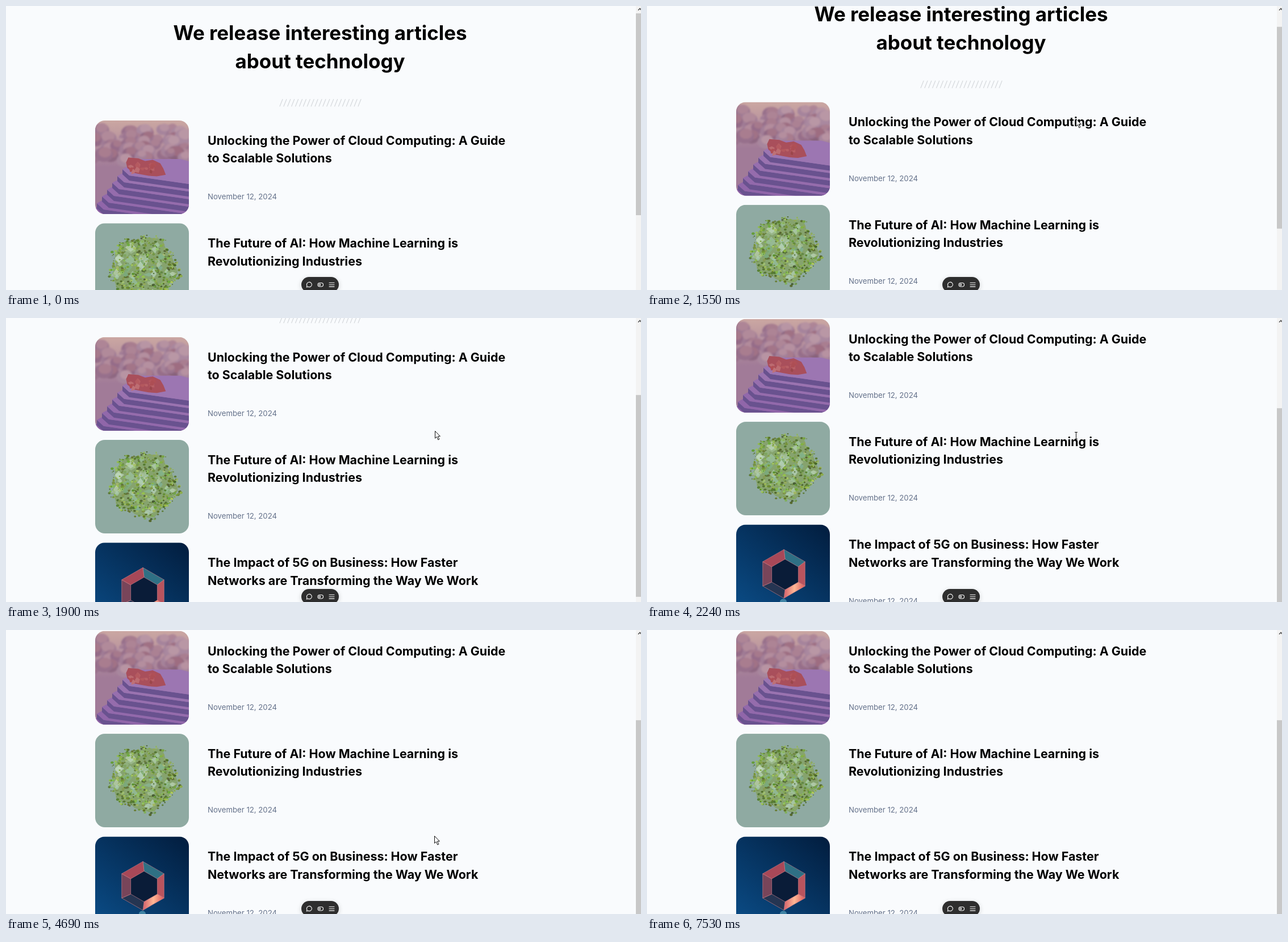
These frames come from a looping animation (1118 px wide and 501 px high, 8130 ms). An HTML page:

```html
<!DOCTYPE html>
<html lang="en">
<head>
<meta charset="utf-8">
<title>Articles about technology</title>
<style>
  html, body { margin: 0; width: 100%; height: 100%; overflow: hidden; background: #f9fbfd; }
  svg { display: block; width: 100%; height: 100%; }
  text { font-family: Inter, "Open Sans", sans-serif; font-weight: 700; }
  .heading { font-size: 34.9px; text-anchor: middle; }
  .title { font-size: 21.4px; }
  .date { font-size: 13.2px; font-weight: 400; fill: #64718a; }
  .line { fill: none; stroke-linecap: round; stroke-linejoin: round; }
</style>
</head>
<body>
<svg viewBox="0 0 1118 501">
  <defs>
    <clipPath id="card"><rect width="165" height="165" rx="17"/></clipPath>
    <filter id="soft"><feGaussianBlur stdDeviation="1.6"/></filter>
    <filter id="shadow" x="-50%" y="-80%" width="200%" height="260%"><feGaussianBlur stdDeviation="5"/></filter>
    <linearGradient id="dusk" x2="0" y2="1">
      <stop stop-color="#cba7a2"/><stop offset=".5" stop-color="#a17b98"/>
    </linearGradient>
    <linearGradient id="night" x1="1" x2=".2" y2="1">
      <stop stop-color="#021d3e"/><stop offset="1" stop-color="#0a4a83"/>
    </linearGradient>
    <linearGradient id="glow">
      <stop stop-color="#d5606a"/><stop offset=".5" stop-color="#ffb795"/><stop offset="1" stop-color="#d9565a"/>
    </linearGradient>
  </defs>

  <g id="page">
    <text class="heading" x="553" y="60">We release interesting articles</text>
    <text class="heading" x="553" y="109.5">about technology</text>
    <path id="slashes" class="line" stroke="#d3d6da" stroke-width="1.1"/>
    <g id="cards"></g>
  </g>

  <rect x="1109" width="9" height="501" fill="#f3f3f3"/>
  <rect id="thumb" x="1109" y="13" width="9" height="356" fill="#c8c8c8"/>
  <path d="M1113 7.5l3-3 3 3" fill="none" stroke="#555" stroke-width="1.6"/>

  <rect x="520" y="480" width="66" height="27" rx="13" opacity=".15" filter="url(#shadow)"/>
  <rect x="520" y="478" width="66" height="27" rx="13.5" fill="#2e2e2e"/>
  <g class="line" stroke="#fff" stroke-width="1.1">
    <path d="M529.2 496l.8-2.4a4.5 4.3 0 1 1 1.9 1.7z"/>
    <rect x="549" y="488.5" width="9.5" height="6.5" rx="3.2"/>
    <circle cx="552.3" cy="491.7" r="1.4"/>
    <path d="M569 488.3h9m-9 3.4h9m-9 3.4h9"/>
  </g>

  <path id="arrow" d="M.5 .5V13.2l2.9-2.7 2.4 5.4 2.1-1-2.4-5.2h3.9z" fill="#fff" stroke="#111" stroke-linejoin="round"/>
  <path id="beam" d="M-2 2.5h5M.5 2.5v12M-2 14.5h5" fill="none" stroke="#111"/>
</svg>

<script>
const LOOP = 8130;
const byId = id => document.getElementById(id);
const repeat = (count, make) => Array.from({ length: count }, (_, i) => make(i)).join("");
const poly = (points, fill) => `<polygon points="${points}" fill="${fill}"/>`;
const blob = (x, y, r, fill) => `<ellipse cx="${x}" cy="${y}" rx="${r}" ry="${r * .8}" fill="${fill}"/>`;
const backdrop = fill => `<rect width="165" height="165" fill="${fill}"/>`;

let seed = 11;
const random = (low = 0, high = 1) =>
  low + (high - low) * (seed = seed * 16807 % 2147483647) / 2147483647;

// Points around a centre; radius may depend on the angle.
const ring = (count, cx, cy, radius) => Array.from({ length: count }, (_, i) => {
  const angle = (i / count) * 2 * Math.PI - Math.PI / 2, r = radius(angle);
  return [cx + r * Math.cos(angle), cy + r * Math.sin(angle)];
});

function cloudStairs() {
  const puff = i => {
    const x = random(-5, 170), y = 20 + i * .75 + random(-7, 7), r = random(9, 17);
    const light = random(46, 60);
    return blob(x, y, r, `hsl(318 16% ${light}%)`) + blob(x + 2, y - 4, r * .7, `hsl(335 20% ${light + 6}%)`);
  };
  const slab = i => {
    const step = 6 - i;
    return `<g transform="translate(${-9 * step} ${12 * step})">
      <path d="M48 86L60 97 290 130v9L60 106 48 95z" fill="#69528f"/>
      <path d="M48 86L80 68H150L290 105V130L60 97z" fill="hsl(278 28% ${58 - step}%)"/></g>`;
  };
  const boulder = ring(13, 88, 81, angle => 24 + 14 * Math.abs(Math.cos(angle)) + random(-6, 3))
    .map(([x, y]) => [x, 83 + (y - 83) * .58 + (x - 88) * .16]);
  return backdrop("url(#dusk)") + `<g filter="url(#soft)">${repeat(64, puff)}</g>` + repeat(7, slab)
    + poly(boulder, "#a94f5b")
    + repeat(14, () => poly(ring(5, random(62, 108), random(72, 92), () => random(2, 7)), `hsl(356 38% ${random(44, 60)}%)`));
}

function crystalPlant() {
  const edge = angle => 59 + 4 * Math.sin(5 * angle + 1) + 2 * Math.sin(11 * angle);
  const scatter = reach => {
    const angle = random(0, 2 * Math.PI), r = Math.sqrt(random()) * reach * edge(angle);
    return [86 + r * Math.cos(angle), 80 + r * Math.sin(angle) * .97];
  };
  const leaf = () => blob(...scatter(1.04), random(.9, 2.8), `hsl(${random(74, 94)} ${random(28, 50)}% ${random(28, 60)}%)`);
  const shard = () => {
    const [x, y] = scatter(.85);
    return poly(ring(4, x, y, () => random(3, 10)), `hsl(${random(95, 165)} 25% ${random(55, 84)}% / .65)`);
  };
  return backdrop("#8faaa2") + poly(ring(40, 86, 80, angle => edge(angle) * .93), "#86a36e")
    + repeat(400, leaf) + repeat(45, shard) + repeat(220, leaf);
}

function glassCube() {
  const faces = ["#2f7084", "#b8545e", "url(#glow)", "#253552", "#78455a", "#a84858"];
  const outer = ring(6, 84, 87, () => 43);
  const inner = ring(6, 86, 88, () => 27);
  const face = i => {
    const j = (i + 1) % 6;
    return `<polygon points="${[outer[i], outer[j], inner[j], inner[i]]}" fill="${faces[i]}" stroke="#d48488" stroke-width=".6"/>`;
  };
  return backdrop("url(#night)") + blob(83, 136, 6, "#3f83a4") + poly(inner, "#0a1c38") + repeat(6, face);
}

const articles = [
  [cloudStairs, "Unlocking the Power of Cloud Computing: A Guide", "to Scalable Solutions"],
  [crystalPlant, "The Future of AI: How Machine Learning is", "Revolutionizing Industries"],
  [glassCube, "The Impact of 5G on Business: How Faster", "Networks are Transforming the Way We Work"]
];
byId("cards").innerHTML = articles.map(([art, first, second], i) => `
  <g transform="translate(157 ${202 + 181.3 * i})">
    <g clip-path="url(#card)">${art()}</g>
    <text class="title" x="198" y="43">${first}</text>
    <text class="title" x="198" y="74.3">${second}</text>
    <text class="date" x="198" y="139.3">November 12, 2024</text>
  </g>`).join("");
byId("slashes").setAttribute("d", repeat(21, i => `M${482 + 6.9 * i} 177l5-12.5`));

// Pointer moves: start time, duration, destination.
const entry = [1063, 490];
const moves = [
  [70, 810, 788, 259], [900, 250, 755, 199], [2240, 610, 755, 209], [3130, 830, 730, 294],
  [3960, 390, 718, 328], [4350, 340, 754, 363], [6550, 70, 788, 363], [6620, 840, 1039, 490]
];
const pointerAt = t => moves.reduce(([x, y], [start, duration, toX, toY]) => {
  const u = Math.min(1, Math.max(0, (t - start) / duration));
  const eased = 1 - (1 - u) ** 2;
  return [x + (toX - x) * eased, y + (toY - y) * eased];
}, entry);

// cubic-bezier(.25, .1, .25, 1), solved by bisection
function ease(x) {
  let low = 0, high = 1;
  for (let i = 0; i < 20; i++) {
    const s = (low + high) / 2;
    if (.75 * s * (1 - s) + s ** 3 < x) low = s; else high = s;
  }
  return .3 * low * (1 - low) ** 2 + 3 * low ** 2 * (1 - low) + low ** 3;
}

function scrollAt(t) {
  if (t < 1480) return 0;
  const tick = Math.min(2240, 1480 + 69 * Math.floor((t - 1480) / 69));
  return 200.6 * ease((tick - 1430) / 860);
}

function draw() {
  const t = performance.now() % LOOP;
  const scroll = scrollAt(t);
  const overText = t >= 2240 && t < 3200;
  const onStage = t >= 70 && t < 7530;
  byId("page").setAttribute("transform", `translate(0 ${-scroll})`);
  byId("thumb").setAttribute("y", 13 + scroll * .73);
  for (const [id, shown] of [["arrow", onStage && !overText], ["beam", overText]]) {
    byId(id).style.display = shown ? "" : "none";
    byId(id).setAttribute("transform", `translate(${pointerAt(t)})`);
  }
  requestAnimationFrame(draw);
}
draw();
</script>
</body>
</html>
```
